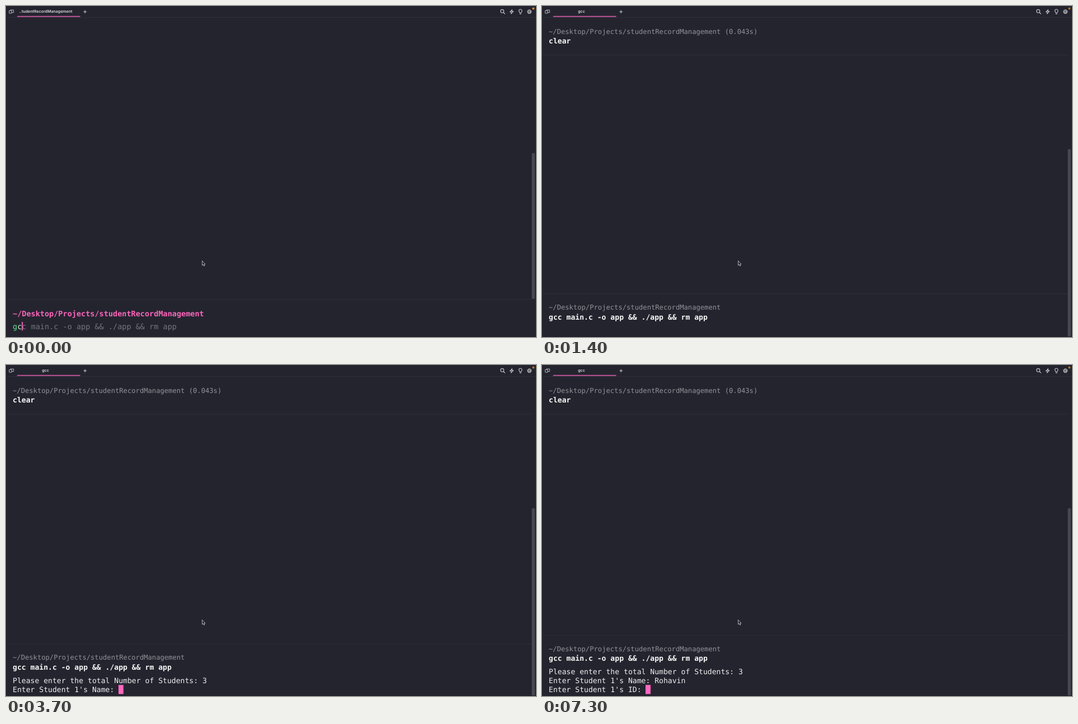
Write an HTML page that moves like this. It is 947 px wide and 592 px high and loops after 8 s.

```html
<!DOCTYPE html>
<html lang="en">
<head>
<meta charset="utf-8">
<title>Terminal session</title>
<style>
  html, body { margin: 0; width: 100%; height: 100%; overflow: hidden; background: #24242f; }
  svg { display: block; }
  :root { --cell: 7.886px; }

  text {
    font-family: "DejaVu Sans Mono", monospace;
    font-size: 13.1px;
    fill: #eeeeef;
    white-space: pre;
    text-rendering: geometricPrecision;
  }
  .title { font: 600 7px Inter, sans-serif; text-anchor: middle; fill: #dcdce0; }
  .path { font-size: 12.17px; fill: #929298; }
  .command { font-weight: bold; fill: #f8f8f8; }
  .editor text { font-size: 13.52px; }
  .editor .cwd { font-weight: bold; fill: #fa66ba; }
  .rule { fill: #2f2f3a; }
  .pink { fill: #fd68be; }
  .icon { fill: none; stroke: #c6c6cb; stroke-width: 1.1; stroke-linecap: round; stroke-linejoin: round; }

  .editing, .running, .output, .accepted, .second, .caret, .scroll, .cursor, .dot {
    animation: 8s step-end infinite;
  }
  .editing { animation-name: editing; }
  .running { animation-name: running; }
  .output { animation-name: output; }
  .accepted { animation-name: accepted; }
  .second { animation-name: second; }
  .caret { animation-name: caret; }
  .scroll { animation-name: scroll; }
  .cursor { animation-name: cursor; }
  .dot { animation-name: dot; }

  @keyframes editing { 0% { visibility: visible; } 12.5%, 100% { visibility: hidden; } }
  @keyframes running { 0% { visibility: hidden; } 12.5%, 100% { visibility: visible; } }
  @keyframes output { 0% { visibility: hidden; } 18.75%, 100% { visibility: visible; } }
  @keyframes accepted { 0% { fill: #75757d; } 1.25%, 100% { fill: #e8e8ea; } }
  @keyframes second { 0% { fill: #d4e8da; } 1.25%, 100% { fill: #58e687; } }
  @keyframes caret { 0% { transform: translateX(28.2px); } 1.25%, 100% { transform: translateX(304.8px); } }
  @keyframes dot { 0% { fill: #f08c1c; } 12.5%, 100% { fill: #b8721f; } }
  @keyframes scroll {
    0% { transform: none; }
    46.25% { transform: translateY(-15.75px); }
    91.25%, 100% { transform: translateY(-31.5px); }
  }
  /* Column of the block cursor, in character cells */
  @keyframes cursor {
    0% { transform: translateX(calc(43 * var(--cell))); }
    35% { transform: translateX(calc(44 * var(--cell))); }
    46.25% { transform: translateX(calc(24 * var(--cell))); }
    66.25% { transform: translateX(calc(25 * var(--cell))); }
    68.75% { transform: translateX(calc(26 * var(--cell))); }
    71.25% { transform: translateX(calc(27 * var(--cell))); }
    72.5% { transform: translateX(calc(28 * var(--cell))); }
    75% { transform: translateX(calc(30 * var(--cell))); }
    78.75% { transform: translateX(calc(31 * var(--cell))); }
    91.25%, 100% { transform: translateX(calc(22 * var(--cell))); }
  }
</style>
</head>
<body>
<svg width="947" height="592" viewBox="0 0 947 592">
  <rect width="947" height="592" fill="#24242f"/>

  <g class="editing editor">
    <rect class="rule" y="524.5" width="940" height="1"/>
    <text class="cwd" x="12" y="554.8">~/Desktop/Projects/studentRecordManagement</text>
    <text class="accepted" x="12" y="577.6"><tspan fill="#58e687">g</tspan><tspan class="second">c</tspan>c main.c -o app &amp;&amp; ./app &amp;&amp; rm app</text>
    <rect class="caret pink" y="565" width="1.8" height="15.5"/>
    <rect x="939.5" y="263" width="5.5" height="261" rx="2" fill="#484852"/>
  </g>

  <g class="running">
    <text class="path" x="12" y="50">~/Desktop/Projects/studentRecordManagement (0.043s)</text>
    <text class="command" x="12" y="67.4">clear</text>
    <rect class="rule" y="87.5" width="940" height="1"/>
    <svg width="947" height="588.5">
      <g class="scroll">
        <rect class="rule" y="514" width="940" height="1"/>
        <text class="path" x="12" y="543">~/Desktop/Projects/studentRecordManagement</text>
        <text class="command" x="12" y="560.7">gcc main.c -o app &amp;&amp; ./app &amp;&amp; rm app</text>
        <g class="output">
          <text x="12" y="584.6">Please enter the total Number of Students: 3</text>
          <text x="12" y="600.35">Enter Student 1's Name: Rohavin</text>
          <text x="12" y="616.1">Enter Student 1's ID: </text>
        </g>
      </g>
      <!-- The cursor masks whatever has not been typed yet -->
      <g class="output">
        <g class="cursor">
          <rect x="12" y="572.3" width="400" height="17" fill="#24242f"/>
          <rect class="pink" x="12" y="572.2" width="8.5" height="16.3"/>
        </g>
      </g>
    </svg>
    <rect x="939.5" y="256" width="5.5" height="340" rx="2" fill="#484852"/>
  </g>

  <rect class="rule" y="20" width="947" height="1" fill="#34343f"/>
  <rect x="20" y="17.8" width="112.5" height="1.8" fill="#cc58a0"/>
  <text class="title editing" x="71" y="12.4">..tudentRecordManagement</text>
  <text class="title running" x="70.5" y="12.4">gcc</text>

  <g class="icon">
    <path d="M6.2 8.2h4v4.8h-4zM8.2 8V7h5.4v4.6h-3.2" stroke-width=".9"/>
    <path d="M138.7 10.2h5M141.2 7.7v5"/>
    <circle cx="886.6" cy="9.3" r="2.9"/>
    <path d="M888.8 11.5l2.6 2.6"/>
    <path d="M904.3 6.5l-4 4.3h2.7l-.5 3.2 4.1-4.4h-2.8z"/>
    <path d="M918 12.2c0-1.4-1.6-1.8-1.6-3.4a2.8 2.8 0 0 1 5.6 0c0 1.6-1.6 2-1.6 3.4zM918.2 14.1h2"/>
    <circle cx="935.2" cy="10.2" r="2.7"/>
    <circle cx="935.2" cy="10.2" r="1" stroke-width=".8"/>
    <circle cx="935.2" cy="10.2" r="3.7" stroke-width="1" stroke-linecap="butt" stroke-dasharray="1.45 1.456"/>
  </g>
  <circle class="dot" cx="942.3" cy="4.4" r="2"/>

  <path d="M350.6 455.8v8.1l1.8-1.6 1.3 2.7 1.3-.6-1.2-2.6h2.2z" fill="#181820" stroke="#d8d8dc" stroke-width=".8" stroke-linejoin="round"/>
  <path d="M.5 0v592M0 591.5h947" fill="none" stroke="#1c1c25"/>
</svg>
</body>
</html>
```
